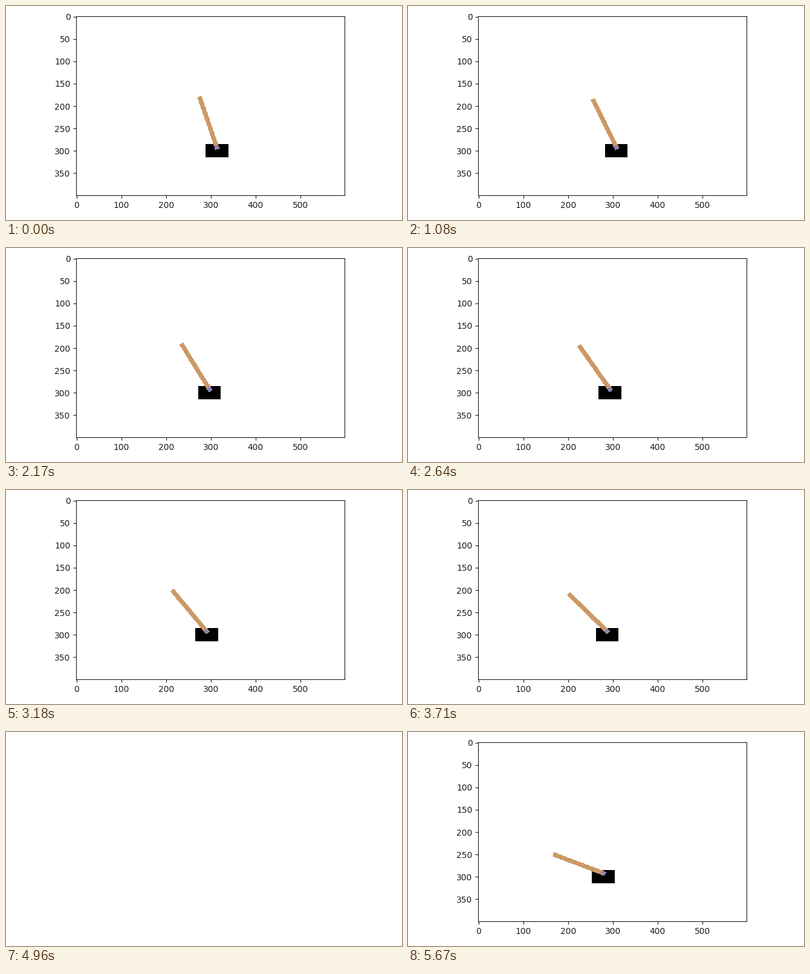
Recreate the animation shown at these times as a matplotlib script. Size 655x355 px, loop 6450 ms.

```python
import numpy as np
import matplotlib.pyplot as plt
from matplotlib.animation import FuncAnimation

W, H, DPI = 655, 355, 100
LOOP, TICK = 6450, 30
VIEW_W, VIEW_H = 600, 400
LAST = 25            # last step of the simulation
REFRESH = 77.2       # ms between screen refreshes
CLEARED = {*range(11, 17), 18, 20, 23}   # steps preceded by an empty output

INK = "#1c1c1c"
BLACK = (0, 0, 0)
WOOD = (0.8, 0.6, 0.4)
AXLE = (0.52, 0.52, 0.74)
CART_Y, AXLE_Y = 300, 292.5

plt.rcParams.update({
    "font.family": "DejaVu Sans", "font.size": 10, "axes.edgecolor": INK,
    "xtick.color": INK, "ytick.color": INK,
})

# The pole falls along a smooth curve through a few leans (degrees)
lean_curve = np.polyfit([0, 7, 13, 19, 25], [19, 26.2, 31.8, 45.7, 69.3], 4)
yy, xx = np.mgrid[0:VIEW_H, 0:VIEW_W] + 0.5


def start(step):
    """Time at which a step appears; each one takes a little longer."""
    return round((102 * step + 4.98 * step ** 2) / REFRESH) * REFRESH


def cart_x(step):
    return np.interp(step, [4, 7, 13, 19, 25], [314.4, 309, 298, 288, 279.8])


def render(step):
    """Rasterise the cart and pole without antialiasing."""
    cx = cart_x(step)
    lean = np.radians(np.polyval(lean_curve, step))
    view = np.ones((VIEW_H, VIEW_W, 3))

    view[(abs(xx - cx) < 25.5) & (abs(yy - CART_Y) < 15.5)] = BLACK

    dx, dy = xx - cx, yy - AXLE_Y
    along = -dx * np.sin(lean) - dy * np.cos(lean)
    across = dx * np.cos(lean) - dy * np.sin(lean)
    view[(abs(across) < 5) & (along > -5) & (along < 120)] = WOOD
    view[dx ** 2 + dy ** 2 < 25] = AXLE
    return view


starts = [start(i) for i in range(LAST + 1)]
views = [render(i) for i in range(LAST + 1)]

fig = plt.figure(figsize=(W / DPI, H / DPI), dpi=DPI, facecolor="white")
left, top, width, height = 116.4, 17.2, 443.9, 296.9
ax = fig.add_axes([left / W, 1 - (top + height) / H, width / W, height / H])
image = ax.imshow(views[0], interpolation="nearest", aspect="auto")
ax.set_xticks(range(0, VIEW_W, 100))
ax.set_yticks(range(0, VIEW_H, 50))


def update(frame):
    now = (frame + 1) * TICK - 1
    step = np.searchsorted(starts, now, side="right") - 1
    coming = step + 1
    empty = coming in CLEARED and now >= starts[coming] - REFRESH
    image.set_data(views[step])
    ax.set_visible(not empty)
    return [image]


anim = FuncAnimation(fig, update, frames=LOOP // TICK, interval=TICK,
                     repeat=True, repeat_delay=0, blit=False)
plt.show()
```
